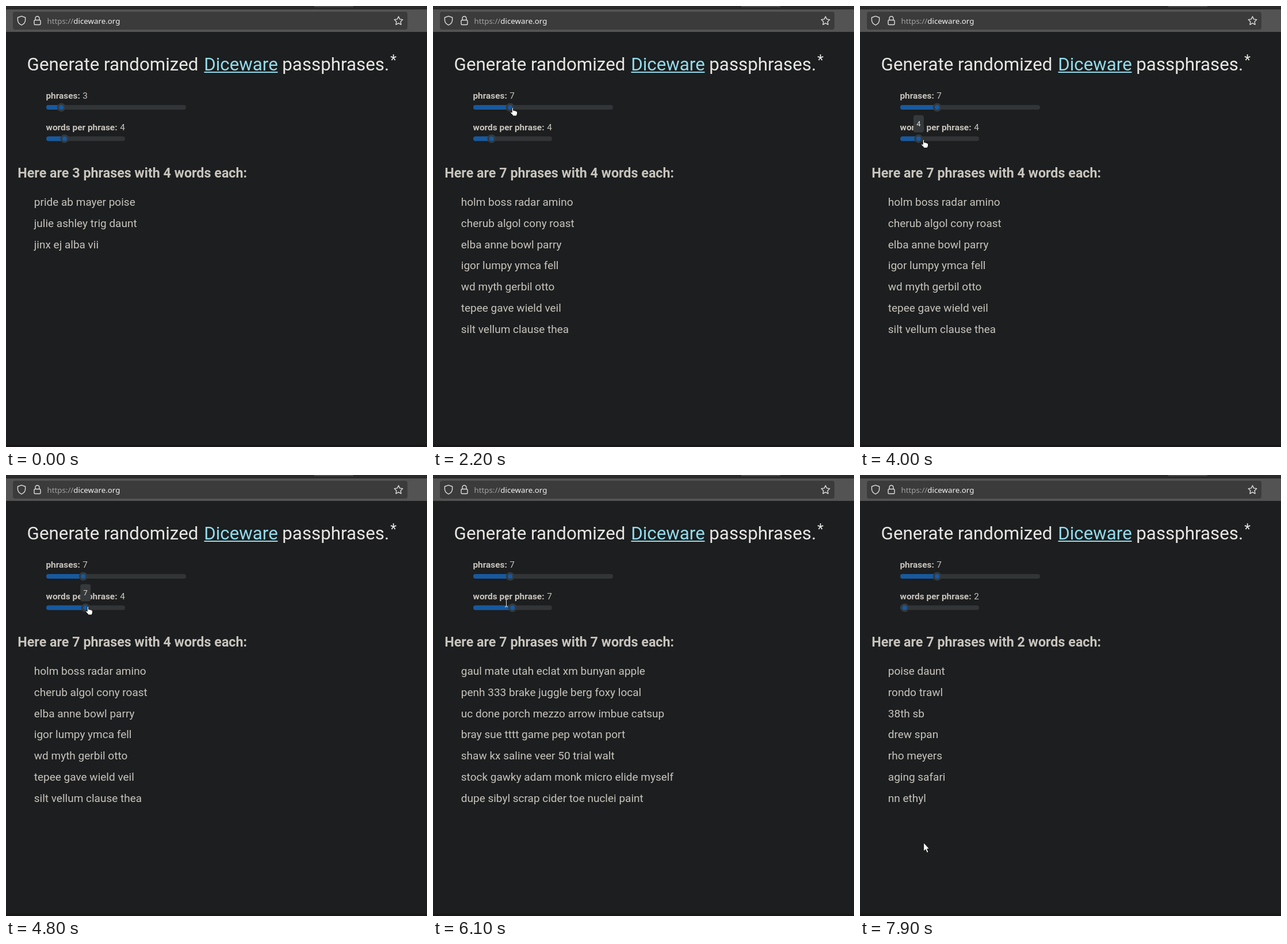
Write an HTML page that moves like this. It is 732 by 766 pixels and loops after 8 s.

```html
<!DOCTYPE html>
<html lang="en">
<head>
<meta charset="utf-8">
<title>Passphrase generator</title>
<style>
  html, body { margin: 0; width: 100%; height: 100%; overflow: hidden; background: #1c1e1f; }
  svg { display: block; width: 732px; height: 766px; font-family: Roboto, sans-serif; }
  text { white-space: pre; fill: #c8c4bd; }
  .title { font-size: 31.3px; fill: #e8e6e3; }
  .link { fill: #92dbec; }
  .label { font-size: 15.4px; }
  .head { font-size: 23.3px; }
  .bold { font-weight: 700; }
  .item { font-size: 19px; }
  .url { font: 13.3px "Noto Sans", sans-serif; fill: #a2a2a2; }
  .icon { fill: none; stroke: #dedede; stroke-width: 1.4; stroke-linejoin: round; }
  .tip text { font-size: 13px; fill: #e0ddd8; text-anchor: middle; }
  .track { fill: #323537; }
  .fill, .dot { fill: #17599f; }
  .ring { fill: #35393b; }
  .pointer path { fill: #fff; stroke: #111; stroke-width: 1; stroke-linejoin: round; }
</style>
</head>
<body>
<svg viewBox="0 0 732 766">
  <rect width="732" height="766" fill="#1c1e1f"/>
  <rect y="762" width="732" height="4" fill="#1a1719"/>

  <rect width="732" height="45" fill="#535353"/>
  <rect width="732" height="6" fill="#2a2a2a"/>
  <rect x="536" width="68" height="2" fill="#484848"/>
  <rect x="12" y="10" width="686" height="31" rx="4" fill="#3b3b3b"/>
  <path class="icon" d="M27 17.7 33.6 20v4.5q0 5.6-6.6 8.6-6.6-3-6.6-8.6V20Z"/>
  <path class="icon" d="M50.5 24.5h8q1.5 0 1.5 1.5v5q0 1.5-1.5 1.5h-8q-1.5 0-1.5-1.5v-5q0-1.5 1.5-1.5ZM51 24.5v-3a3.5 3.5 0 0 1 7 0v3"/>
  <path class="icon" d="M682.5 18.2l2.2 4.7 5.1.7-3.7 3.6.9 5.1-4.5-2.5-4.5 2.5.9-5.1-3.7-3.6 5.1-.7Z"/>
  <text class="url" x="71.5" y="31">https://<tspan fill="#f2f2f2">diceware.org</tspan></text>

  <text class="title" x="36.6" y="112">Generate randomized</text>
  <text class="title link" x="344.2" y="112">Diceware</text>
  <rect class="link" x="344.5" y="114" width="128" height="2"/>
  <text class="title" x="480.3" y="112">passphrases.</text>
  <text x="668.3" y="103" style="font-size:25px;fill:#e8e6e3">*</text>

  <text class="label bold" x="69.4" y="161">phrases:</text>
  <text class="label" id="phrases" x="133.3" y="161"></text>
  <text class="label bold" x="69.6" y="216">words per phrase:</text>
  <text class="label" id="words" x="198.3" y="216"></text>
  <text class="head bold" id="head" x="20.3" y="298"></text>
  <g id="list"></g>
  <g id="sliders"></g>

  <g class="pointer" id="pointer">
    <path id="arrow" d="M.7.5V15.6L4.1 12.5 6.4 18.2 9 17.1 6.7 11.6H10.7Z"/>
    <path id="beam" d="M1 .8Q3.5.8 3.5 2.5 3.5.8 6 .8M3.5 2.5V12.5M1 14.2q2.5 0 2.5-1.7 0 1.7 2.5 1.7" style="fill:none;stroke:#e8e8e8"/>
    <path id="hand" d="M3.2 9V1.8Q3.2.6 4.4.6t1.2 1.2V5.5Q7.8 4.6 8 6.1q2-.7 2.3.7 2.2-.4 2.2 1.5v2.5q0 1.5-1 2.5V15H4.7V13.6L.9 9.9Q.2 8.6 1.3 8.3 2.2 8.1 3.2 9Z"/>
  </g>
</svg>
<script>
const LOOP = 8000, STEP = 100;
const $ = id => document.getElementById(id);

// Generated results: start tick, words per phrase, phrases
const results = [
  [0, 4, ["pride ab mayer poise", "julie ashley trig daunt", "jinx ej alba vii"]],
  [22, 4, ["holm boss radar amino", "cherub algol cony roast", "elba anne bowl parry",
    "igor lumpy ymca fell", "wd myth gerbil otto", "tepee gave wield veil", "silt vellum clause thea"]],
  [52, 7, ["gaul mate utah eclat xm bunyan apple", "penh 333 brake juggle berg foxy local",
    "uc done porch mezzo arrow imbue catsup", "bray sue tttt game pep wotan port",
    "shaw kx saline veer 50 trial walt", "stock gawky adam monk micro elide myself",
    "dupe sibyl scrap cider toe nuclei paint"]],
  [75, 2, ["poise daunt", "rondo trawl", "38th sb", "drew span", "rho meyers", "aging safari", "nn ethyl"]]
];

// Pointer legs: first tick, last tick, end x, end y, shape
const legs = [
  [2, 2, 27, 241, "arrow"], [3, 4, 70, 180, "arrow"], [5, 5, 84, 137, "beam"],
  [6, 7, 90, 176, "hand"], [9, 9, 88, 176, "hand"],
  [11, 13, 92, 176, "hand"], [14, 15, 108, 176, "hand"], [16, 17, 134, 176, "hand"],
  [23, 24, 52, 500, "arrow"], [29, 29, 34, 518, "arrow"], [30, 32, 95, 270, "arrow"],
  [33, 33, 104, 192, "beam"], [34, 34, 110, 232, "hand"], [36, 37, 101, 232, "hand"],
  [40, 44, 126, 230, "hand"], [47, 48, 138, 228, "hand"],
  [53, 55, 110, 640, "arrow"], [56, 58, 100, 600, "arrow"], [59, 59, 110, 390, "arrow"],
  [60, 60, 116, 194, "beam"], [61, 61, 124, 215, "beam"], [62, 63, 138, 228, "hand"],
  [68, 71, 76, 232, "hand"], [72, 72, 67, 237, "arrow"],
  [76, 76, 28, 300, "arrow"], [77, 79, 110, 638, "arrow"]
];

const sliders = [
  { y: 176, width: 243, drags: [[11, 22]],
    pos: v => 77.2 + 9.5 * (v - 1), pick: x => Math.floor((x - 88) / 11.5 + 3) },
  { y: 230.5, width: 137, drags: [[40, 52], [67, 75]],
    pos: v => 77.7 + 12.1 * (v - 2), pick: x => Math.max(2, Math.round((x - 77.7) / 12.1 + 2)) }
];

function pointerAt(tick) {
  let x = 0, y = 0, shape = null;
  for (const [from, to, endX, endY, kind] of legs) {
    if (tick < from) break;
    const k = shape ? Math.min(1, (tick - from + 1) / (to - from + 1)) : 1;
    x += (endX - x) * k;
    y += (endY - y) * k;
    shape = kind;
  }
  return { x, y, shape };
}

function sliderMarkup(s, value, tick, pointer) {
  const held = s.drags.some(([from, to]) => tick >= from && tick < to);
  const v = held ? s.pick(pointer.x) : value;
  const x = s.pos(v), top = s.y - 4;
  const tip = held ? `<g class="tip"><rect class="ring" x="${x - 9}" y="${s.y - 41}" width="18" height="30" rx="4"/>
    <text x="${x}" y="${s.y - 21.5}">${v}</text></g>` : "";
  return `<rect class="track" x="70" y="${top}" width="${s.width}" height="8" rx="4"/>
    <rect class="fill" x="70" y="${top}" width="${x - 70}" height="8" rx="4"/>
    <circle class="ring" cx="${x}" cy="${s.y}" r="7.5"/>
    <circle class="dot" cx="${x}" cy="${s.y}" r="4"/>${tip}`;
}

function draw(tick) {
  const [, words, list] = results.filter(r => r[0] <= tick).pop();
  const count = list.length, pointer = pointerAt(tick);
  $("phrases").textContent = count;
  $("words").textContent = words;
  $("head").textContent = `Here are ${count} phrases with ${words} words each:`;
  $("list").innerHTML = list.map((line, i) =>
    `<text class="item" x="48.8" y="${Math.round(347 + 36.75 * i)}">${line}</text>`).join("");
  $("sliders").innerHTML = sliders.map((s, i) =>
    sliderMarkup(s, i ? words : count, tick, pointer)).join("");
  $("pointer").setAttribute("transform", `translate(${pointer.x} ${pointer.y})`);
  for (const id of ["arrow", "beam", "hand"])
    $(id).style.display = id === pointer.shape ? "" : "none";
}

let last = -1;
function frame() {
  const tick = Math.floor(performance.now() % LOOP / STEP);
  if (tick !== last) draw(last = tick);
  requestAnimationFrame(frame);
}
frame();
</script>
</body>
</html>
```
